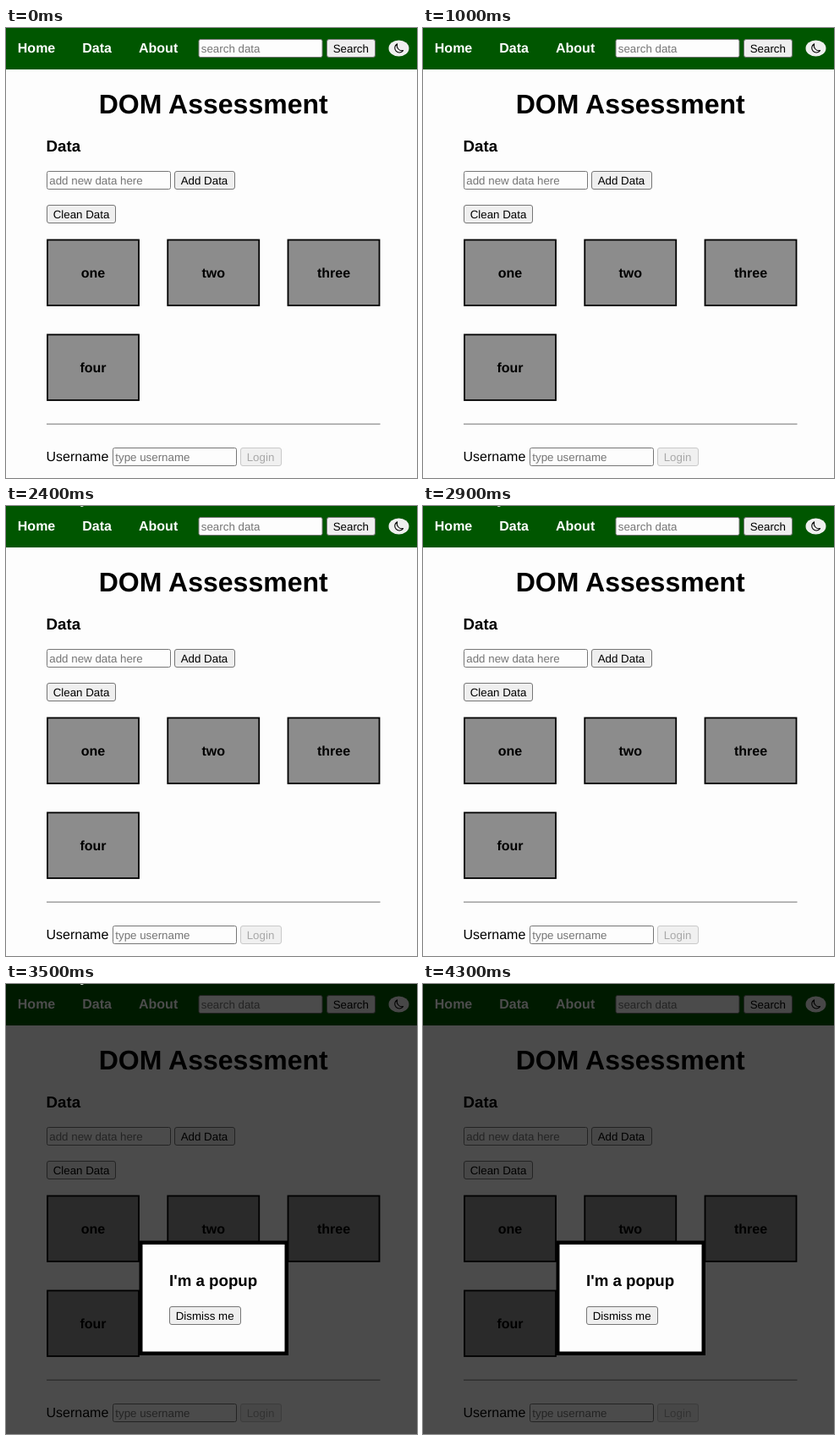
Recreate the animation shown at these times as an HTML page. Size 486 by 532 pixels, loop 5 s.

```html
<!DOCTYPE html>
<html lang="en">
<head>
<meta charset="utf-8">
<title>DOM Assessment</title>
<style>
  html, body { margin: 0; width: 100%; height: 100%; overflow: hidden; background: #fdfdfd; }
  svg { display: block; width: 486px; height: 532px; }
  text { font-family: "Liberation Sans", Arial, sans-serif; text-rendering: geometricPrecision; }
</style>
</head>
<body>
<svg id="stage" viewBox="0 0 486 532" xmlns="http://www.w3.org/2000/svg">
  <rect width="486" height="532" fill="#fdfdfd"/>
  <g id="page"></g>
  <g id="modal">
    <rect width="486" height="532" fill="#000" opacity=".7"/>
    <rect x="157.5" y="303.5" width="176.5" height="135.5" fill="#000"/>
    <rect x="161.5" y="308" width="168" height="126.5" fill="#fdfdfd"/>
  </g>
  <path id="pointer" d="M88 0H92L90.5 1H88.5Z" fill="#d4e2d4"/>
</svg>
<script>
const LOOP = 5000;
const POPUP_AT = 3500;
const POINTER_IN = 1600, POINTER_OUT = 4000;
const BODY = 16, HEADING = 18.72, CONTROL = 13.333;

const page = document.getElementById('page');
const modal = document.getElementById('modal');
const pointer = document.getElementById('pointer');

function add(parent, tag, attrs, content) {
  const el = document.createElementNS('http://www.w3.org/2000/svg', tag);
  for (const key in attrs) el.setAttribute(key, attrs[key]);
  if (content) el.textContent = content;
  parent.appendChild(el);
  return el;
}

function label(parent, content, x, y, size, attrs = {}) {
  add(parent, 'text', { x, y, 'font-size': size, fill: '#000', ...attrs }, content);
}

const BOLD = { 'font-weight': 700 };

// Outlined form control, 22px high, with its text on the shared baseline
function control(parent, content, x, y, width, style) {
  add(parent, 'rect', {
    x: x + .5, y: y + .5, width: width - 1, height: 21,
    rx: style.radius, fill: style.fill, stroke: style.stroke
  });
  label(parent, content, x + style.pad, y + 15.5, CONTROL, { fill: style.text });
}

const INPUT = { fill: '#fdfdfd', stroke: '#767676', text: '#757575', radius: 2, pad: 3.3 };
const BUTTON = { fill: '#efefef', stroke: '#767676', text: '#000', radius: 2.5, pad: 7.7 };
const DISABLED = { fill: '#f0f0f0', stroke: '#c9c9c9', text: '#a8a8a8', radius: 2.5, pad: 7.7 };

function drawHeader() {
  add(page, 'rect', { width: 486, height: 49, fill: '#005600' });
  [['Home', 13.8], ['Data', 90.3], ['About', 157]].forEach(([name, x]) =>
    label(page, name, x, 29.2, BODY, { ...BOLD, fill: '#fff' }));
  control(page, 'search data', 227.5, 13, 147, INPUT);
  control(page, 'Search', 379, 13, 58, BUTTON);
  add(page, 'ellipse', { cx: 464.5, cy: 24, rx: 12, ry: 9.5, fill: '#efefef' });
  add(page, 'path', {
    d: 'M462.6 18.8A5.4 5.4 0 1 0 469.6 26.6A6 6 0 0 1 462.6 18.8Z',
    fill: 'none', stroke: '#000', 'stroke-width': 1.1, 'stroke-linejoin': 'round'
  });
}

function drawCard(name, i) {
  const x = 48 + (i % 3) * 142.25;
  const y = 249.5 + Math.floor(i / 3) * 112;
  add(page, 'rect', {
    x: x + 1, y: y + 1, width: 108, height: 77.5,
    fill: '#8c8c8c', stroke: '#000', 'stroke-width': 1.8
  });
  label(page, name, x + 55, y + 45.2, BODY, { ...BOLD, 'text-anchor': 'middle' });
}

function drawMain() {
  label(page, 'DOM Assessment', 245.2, 100.5, 32, { ...BOLD, 'text-anchor': 'middle' });
  label(page, 'Data', 47.5, 146, HEADING, BOLD);
  control(page, 'add new data here', 48, 169, 147, INPUT);
  control(page, 'Add Data', 199, 169, 72, BUTTON);
  control(page, 'Clean Data', 48, 209, 82, BUTTON);
  ['one', 'two', 'three', 'four'].forEach(drawCard);
  add(page, 'rect', { x: 48, y: 467.5, width: 394.5, height: 1.5, fill: '#a0a0a0' });
  label(page, 'Username', 47.5, 511.5, BODY);
  control(page, 'type username', 126, 496, 147, INPUT);
  control(page, 'Login', 277, 496, 49, DISABLED);
}

function drawModal() {
  label(modal, "I'm a popup", 193, 357, HEADING, BOLD);
  control(modal, 'Dismiss me', 193, 381, 85, BUTTON);
}

function show(el, visible) {
  el.setAttribute('visibility', visible ? 'visible' : 'hidden');
}

function render(t) {
  show(modal, t >= POPUP_AT);
  show(pointer, t >= POINTER_IN && t < POINTER_OUT);
}

drawHeader();
drawMain();
drawModal();
render(0);

const start = performance.now();
function tick() {
  render((performance.now() - start) % LOOP);
  requestAnimationFrame(tick);
}
requestAnimationFrame(tick);
</script>
</body>
</html>
```
